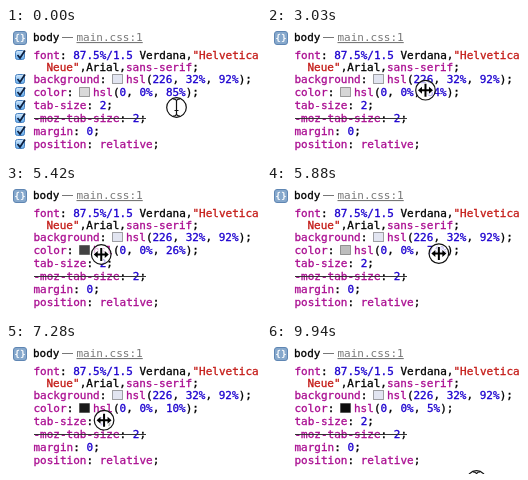
An HTML page that plays this animation: 255 px wide and 130 px high, repeating every 10000 ms.

```html
<!DOCTYPE html>
<html>
<head>
<meta charset="utf-8">
<style>
html, body { margin: 0; width: 100%; height: 100%; overflow: hidden; background: #fff; }
svg { display: block; }
text { font: 11px "DejaVu Sans Mono", monospace; white-space: pre; color: #000; }
text, tspan { fill: currentColor; stroke: currentColor; stroke-width: .3; }
.p { color: #aa0d91; }
.n { color: #1c00cf; }
.s { color: #c41a16; }
.link { color: #777; stroke: none; }
.icon { font-size: 9.5px; color: #fff; }
</style>
</head>
<body>
<svg width="255" height="130" viewBox="0 0 255 130">
  <defs>
    <linearGradient id="blue" x2="0" y2="1">
      <stop stop-color="#d3e8fb"/><stop offset="1" stop-color="#5fa9ec"/>
    </linearGradient>
    <g id="check">
      <rect x="9.5" y="-4.5" width="9" height="9" rx="2" fill="url(#blue)" stroke="#4a82c0"/>
      <path d="M11.5 0l2.5 3l5-7.5" fill="none" stroke="#0b1d3c" stroke-width="1.7"/>
    </g>
  </defs>
  <rect x="7.5" y="3.5" width="13" height="13" rx="2.5" fill="#86a8cc" stroke="#5f86b3"/>
  <text x="8.3" y="13" class="icon">{}</text>
  <text x="27" y="13">body</text>
  <path d="M56 9.5h11" stroke="#777"/>
  <text x="70.5" y="13" class="link" text-decoration="underline">main.css:1</text>

  <text x="27.5" y="31"><tspan class="p">font</tspan>: <tspan class="n">87.5%/1.5</tspan> Verdana,<tspan class="s">"Helvetica</tspan></text>
  <text x="40.5" y="43"><tspan class="s">Neue"</tspan>,Arial,<tspan class="p">sans-serif</tspan>;</text>
  <text x="27.5" y="55"><tspan class="p">background</tspan>:</text>
  <rect x="106.5" y="46.5" width="10" height="9" fill="#e2e5f1" stroke="#000" stroke-opacity=".35"/>
  <text x="120" y="55"><tspan class="p">hsl</tspan>(<tspan class="n">226</tspan>, <tspan class="n">32%</tspan>, <tspan class="n">92%</tspan>);</text>
  <text x="27.5" y="68"><tspan class="p">color</tspan>:</text>
  <rect id="swatch" x="73.5" y="59.5" width="10" height="9" stroke="#000" stroke-opacity=".35"/>
  <text x="87" y="68"><tspan class="p">hsl</tspan>(<tspan class="n">0</tspan>, <tspan class="n">0%</tspan>, <tspan class="n" id="light"></tspan>);</text>
  <text x="27.5" y="81"><tspan class="p">tab-size</tspan>: <tspan class="n">2</tspan>;</text>
  <text x="27.5" y="94"><tspan class="p">-moz-tab-size</tspan>: <tspan class="n">2</tspan>;</text>
  <path d="M28 90.5H140" stroke="#333"/>
  <text x="27.5" y="107"><tspan class="p">margin</tspan>: <tspan class="n">0</tspan>;</text>
  <text x="27.5" y="120"><tspan class="p">position</tspan>: <tspan class="p">relative</tspan>;</text>

  <g id="checks"></g>
  <g id="pointer">
    <circle id="ring" r="9.8" fill="#fff" fill-opacity=".7" stroke="#111" stroke-width="1.2"/>
    <path id="beam" d="M-3.5-8.5Q0-8.5 0-6Q0-8.5 3.5-8.5M0-6V6M-3.5 8.5Q0 8.5 0 6Q0 8.5 3.5 8.5M-2 3H2" fill="none" stroke="#111" stroke-width="1.2"/>
    <path id="resize" d="M-7.5 0l4-3.5v2.5h2.5v-5.5h2v5.5h2.5v-2.5l4 3.5l-4 3.5v-2.5h-2.5v5.5h-2v-5.5h-2.5v2.5z" stroke="#fff" stroke-width="1.5" paint-order="stroke"/>
  </g>
</svg>
<script>
const $ = id => document.getElementById(id);
const show = (id, on) => $(id).style.display = on ? "" : "none";

const rows = [27, ...Array.from({ length: 6 }, (_, i) => 51 + 13 * i)];
$("checks").innerHTML = rows.map(y => `<use href="#check" y="${y}"/>`).join("");

// Each move eases the pointer and the lightness to a new state, then rests.
const rest = { x: 170.5, y: 79.5, light: 85 };
const moves = [
  { from: 1190, to: 1370, x: 167.5, y: 58 },
  { from: 1550, to: 2020, y: 61.5 },
  { from: 2980, to: 3320, x: 135, y: 64, light: 81 },
  { from: 3810, to: 4730, x: 95, y: 68.5, light: 26 },
  { from: 5420, to: 6120, x: 182, y: 67.5, light: 80 },
  { from: 6550, to: 7450, x: 95, y: 76.5, light: 7 },
  { from: 7570, to: 7980, x: 93.5, light: 5 },
  { from: 9110, to: 9290, y: 125 },
  { from: 9870, to: 9880, x: 209.5, y: 136.5 }
];

function pose(t) {
  const state = { ...rest };
  for (const { from, to, ...goal } of moves) {
    const left = 1 - Math.min(1, Math.max(0, (t - from) / (to - from)));
    const eased = 1 - left * left;
    for (const key in goal) state[key] += (goal[key] - state[key]) * eased;
  }
  return state;
}

function draw() {
  const t = performance.now() % 10000;
  const { x, y, light } = pose(t), percent = Math.round(light) + "%";
  const dragging = t >= 2860 && t < 8630;
  const resizing = t >= 1610 && t < 8630;
  $("light").textContent = percent;
  $("swatch").setAttribute("fill", `hsl(0, 0%, ${percent})`);
  $("pointer").setAttribute("transform", `translate(${x} ${y})`);
  show("pointer", t < 9290 || t >= 9880);
  show("ring", t < 50 || dragging || t >= 9880);
  show("resize", resizing);
  show("beam", !resizing);
  show("checks", t < 3030 || t >= 8630 && t < 9290);
  requestAnimationFrame(draw);
}
draw();
</script>
</body>
</html>
```
